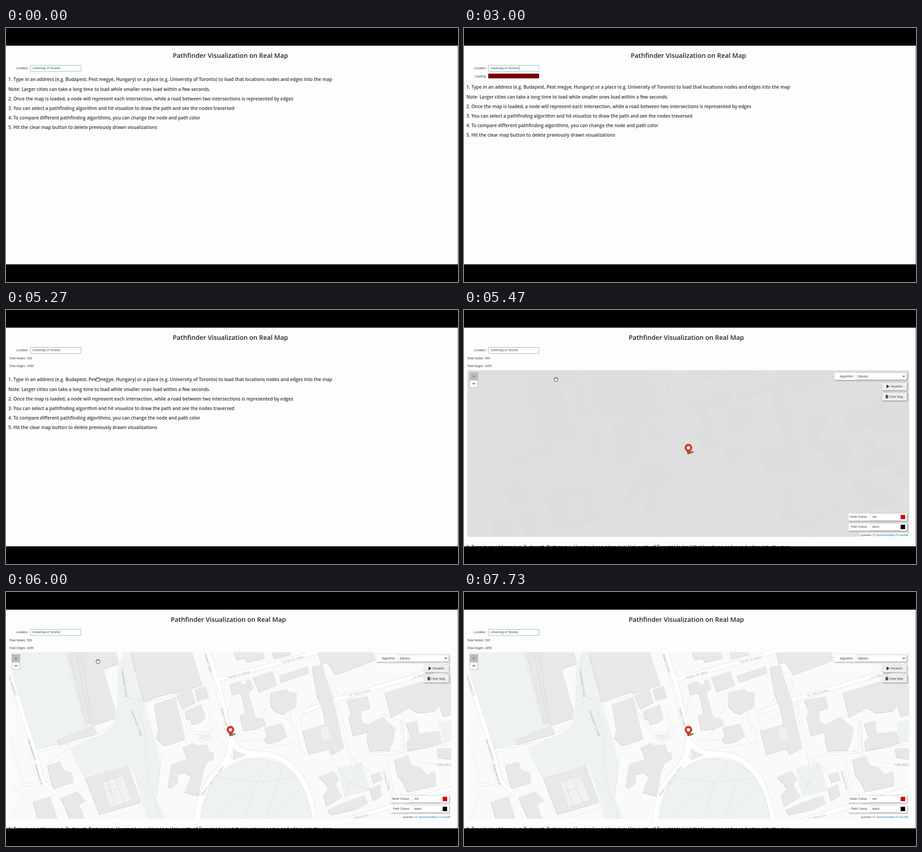
An HTML page for the animation above (8 s loop, 998x561 px).

```html
<!DOCTYPE html>
<html lang="en">
<head>
<meta charset="utf-8">
<title>Pathfinder Visualization</title>
<style>
  html, body { margin: 0; height: 100%; overflow: hidden; background: #000; }
  svg { display: block; width: 998px; height: 561px; }
  text { font: 6.76px "Liberation Sans", Arial, sans-serif; fill: #444; white-space: pre; }
  #title { font: 600 14.35px "Open Sans", sans-serif; fill: #222629; text-anchor: middle; }
  #help text { font: 600 10px "Open Sans", sans-serif; fill: #303437; }
  #labels text { font: 6.6px "Open Sans", sans-serif; fill: #a0a2a4; text-anchor: middle; letter-spacing: .2px; }
  .panel { fill: #fff; filter: drop-shadow(1px 1.5px 1.5px #0007); }
  .button { fill: #eee; filter: drop-shadow(1px 1.5px 1.5px #0007); }
  .field { fill: #fff; stroke: #c4c8c4; stroke-width: .7; }
  .park { fill: #eef3f0; }
  .casing { stroke: #d9dbdb; }
  .road { stroke: #fff; }
  .roads { fill: none; stroke-linejoin: round; }
  .paths { fill: none; stroke: #d0d3d3; stroke-width: .9; stroke-dasharray: 2 1.6; }
</style>
</head>
<body>
<svg viewBox="0 0 998 561">
  <defs>
    <clipPath id="mapClip"><path d="M7 133H983V501H7Z"/></clipPath>
    <g id="buildings">
      <path d="M137 133L178 292L187 288L198 293L243 278L242 258L237 246L216 170L250 158L243 133Z
        M114 326L194 293L201 312L120 337Z
        M275 133H411L434 205L373 224L371 220L305 242Z
        M328 247L374 232L396 324L360 337L349 338L332 322L337 303Z
        M377 228L409 212L419 244L390 258Z
        M397 262L432 248L441 278L430 288L411 292L409 282L399 281Z"/>
      <path d="M495 203L518 196L521 205L533 201L531 194L539 193L547 211L536 222L551 276L570 281L574 293L552 302L525 306L517 272L529 266L520 222L500 227Z
        M546 188L588 175L599 205L560 220Z
        M585 221L621 214L624 220L642 222L641 254L625 261L613 270L596 264L585 252Z
        M572 299L610 290L621 319L602 329L579 335L570 325L577 316Z
        M504 133H567L572 146L532 155L529 146L510 150Z M588 133H627L630 138L592 147Z
        M604 184L666 164L670 178L609 199Z
        M676 165L699 160L704 180L721 228L747 344L722 359L716 352L700 258L687 227Z"/>
      <path d="M655 306L705 292L718 345L669 358Z
        M690 133H812L816 150L728 183L718 165L710 155L696 158Z
        M752 238L799 230L805 256L784 263L787 288L800 293L803 308L767 317L757 276L762 264Z
        M837 222L983 178V270L966 275L958 251L947 263L909 267L891 255L872 266L851 276Z
        M801 291L832 275L845 289L861 300L855 330L848 349L804 351L797 324Z
        M884 290L908 284L912 312L957 307L963 334L930 342L888 350L885 330L894 319Z"/>
      <path d="M391 343L413 332L418 338L444 337L449 352L458 355L460 368L444 376L436 398L426 450L394 442L409 408L397 398L378 403L381 420L364 433L358 428L366 380L401 368Z
        M92 382L120 374L127 393L146 398L149 420L107 433L101 422Z
        M175 409L270 383L299 464L207 491Z
        M60 463L98 451L114 501H71Z M121 454L157 440L176 460L162 470L174 501H142Z
        M691 408L724 395L736 413L728 426L743 452L708 473L701 447L714 433L703 420Z
        M710 481L744 465L793 449L799 466L772 480L718 492Z
        M804 434L826 424L831 449L811 461Z M806 403L826 397L832 414L812 421Z
        M858 370L888 361L896 383L914 386L930 403L947 395L951 427L887 441L875 416L866 407Z
        M952 345H983V369L956 365Z"/>
    </g>
    <path id="streets" d="M440 125L468 219L494 323M7 176L61 344L82 419L110 445M463 195L650 143L705 125M655 265L734 236L990 160M730 510L850 474L983 435"/>
    <path id="crescent" d="M443 125L471 220L495 322Q505 355 554 358Q620 356 657 420Q674 460 682 510M495 320Q500 359 474 388Q426 435 421 510M472 390Q510 357 558 360"/>
    <path id="lanes" d="M65 352L203 317L237 294M305 242L374 225L389 264L408 309L438 314L474 298M420 315Q440 345 458 317M719 190L768 390M770 365L797 359L860 354L983 333M875 285V350M838 353L856 460M52 356L75 420L40 427L7 320"/>
  </defs>

  <path fill="#fdfdfd" d="M0 39H998V522H0Z"/>
  <text id="title" y="66">Pathfinder Visualization on Real Map</text>
  <text x="22" y="91.3">Location:</text>
  <path fill="#fff" stroke="#83bcc5" d="M54 82.5H165.5V96H54Z"/>
  <text x="58.3" y="91.3">University of Toronto</text>
  <path id="caret" stroke="#222" stroke-width=".8" d="M121.6 85V93"/>
  <g id="loading">
    <text x="23.5" y="108.5">Loading:</text>
    <path fill="#780000" d="M53.5 100.8H166V111.2H53.5Z"/>
  </g>
  <g id="totals">
    <text x="7" y="108.5">Total Nodes: 593</text>
    <text x="7" y="125.5">Total Edges: 1656</text>
  </g>
  <g id="help"></g>

  <g id="map">
    <path fill="#dcdcdc" d="M7 133H983V501H7Z"/>
    <g id="tiles" clip-path="url(#mapClip)">
      <path fill="#fafbf9" d="M7 133H983V501H7Z"/>
      <path class="park" d="M10 133H137L190 292L201 314L66 350L44 290L17 197Z
        M248 158L262 133H275L305 242L334 345L342 380L333 458L352 501H310L284 405L272 383L171 408L140 345L201 317L244 282Z
        M732 388L785 377L805 438L747 453Z M424 314L447 307L455 317L442 332L428 325Z M955 290L983 282V330L965 334Z"/>
      <g class="roads">
        <g class="casing">
          <use href="#streets" stroke-width="10.5"/>
          <use href="#crescent" stroke-width="14.5"/>
          <use href="#lanes" stroke-width="5.5"/>
        </g>
        <g class="road">
          <use href="#streets" stroke-width="9"/>
          <use href="#crescent" stroke-width="13"/>
          <use href="#lanes" stroke-width="4"/>
        </g>
        <path class="casing" stroke-width=".8" d="M440 133L468 219L494 323M131 133L174 294M146 133L190 287"/>
      </g>
      <path class="park" stroke="#dcdfdd" d="M432 505Q438 437 474 402Q510 368 555 369Q618 370 651 422Q668 452 677 505Z"/>
      <path fill="#e9e9e5" stroke="#d8d8d6" stroke-width=".7" d="M502 345Q510 355 529 360L501 371Q505 357 502 345Z"/>
      <g class="paths">
        <path d="M262 133Q252 185 274 234Q306 270 308 330Q307 410 329 459L340 501M274 234L243 263M274 234L306 242M217 170L274 234M283 405L330 460"/>
        <path d="M460 490L555 420L585 371M555 420L640 410M575 501L613 378M585 501L655 430M470 410L555 420L525 501"/>
        <path d="M500 230L480 302L520 330L570 325M545 315L575 250L585 238M642 255L675 280L740 250M610 275L640 295L650 345M620 320L665 360L700 385M625 261L635 310M565 345L655 330M690 230L650 275L655 305"/>
        <path d="M732 388L760 422L805 438M785 377L760 422L747 453M735 430L760 422L790 405M760 365L805 395M830 270L875 285L880 350M810 265L830 245M860 350L910 375L983 385M960 320L983 300M870 445L905 475"/>
        <path d="M15 501L38 445L7 435M150 370L175 408M300 475L230 501M345 350L335 430M445 255L460 300M450 300L485 340M90 380L140 345"/>
      </g>
      <use href="#buildings" fill="#d9dada" x="-1.2" y="1.8"/>
      <use href="#buildings" fill="#e8e8e8"/>
      <path fill="#e5e8ea" d="M416 216L440 207L449 234L422 242Z"/>
      <path fill="#f1f2ef" stroke="#d9dada" d="M211 420L259 405L278 460L230 477Z"/>
      <path fill="none" stroke="#d5d6d6" d="M223 417L240 472M242 410L248 434L225 441M248 434L264 465M165 133L190 287M155 133L184 289"/>
      <path class="park" d="M694 301L710 297L717 323L700 329Z"/>
      <g id="labels"></g>
    </g>

    <ellipse cx="500" cy="315" rx="8" ry="2.3" fill="#0007" transform="rotate(-18 500 315)"/>
    <path fill="#d33d2a" stroke="#a82c20" stroke-width=".7" d="M495.5 318.5Q493 313 489.5 309.3A8 8 0 1 1 501.5 309.3Q498 313 495.5 318.5Z"/>
    <circle cx="495.5" cy="304.3" r="3.6" fill="#fff"/>

    <path fill="#bcbcbc" d="M13 138H30.5V155H13Z"/>
    <path fill="#fff" d="M13 155H30.5V171H13Z"/>
    <path fill="none" stroke="#aaa" stroke-width=".8" d="M13 138H30.5V171.5H13ZM13 155H30.5"/>
    <path stroke="#777" stroke-width="1.2" d="M18.5 146.5H25M21.75 143.2V149.8"/>
    <path stroke="#222" stroke-width="1.4" d="M19 162.8H24.8"/>

    <rect class="panel" x="818" y="138" width="160" height="16.5" rx="1"/>
    <path class="field" d="M865.5 139H976.5V153.5H865.5Z"/>
    <text x="830" y="148.7">Algorithm:</text>
    <text x="869.5" y="148.7">Dijkstra</text>
    <path fill="none" stroke="#222" stroke-width="1.2" d="M968.5 144.8L971 147.3L973.5 144.8"/>
    <rect class="button" x="923" y="160.5" width="55" height="17"/>
    <path fill="#222" d="M933 165L939.5 168.7L933 172.5Z"/>
    <text x="941" y="171">Visualize</text>
    <rect class="button" x="923" y="183" width="55" height="17"/>
    <path fill="#222" d="M930.5 188.5H932.5V187.3H934.7V188.5H936.7V189.7H930.5ZM931 190.2H936.2V195H931Z"/>
    <path stroke="#bbb" stroke-width=".5" d="M932.5 191V194.3M933.6 191V194.3M934.7 191V194.3"/>
    <text x="938.3" y="193.8">Clear Map</text>

    <rect class="panel" x="849" y="449" width="129" height="16.5" rx="1"/>
    <path class="field" d="M897 450H962V464.5H897Z"/>
    <text x="852" y="459.3">Node Colour:</text><text x="901.3" y="459.3">red</text>
    <path fill="#e60000" stroke="#888" stroke-width=".5" d="M964.2 452.3H974V462H964.2Z"/>
    <rect class="panel" x="849" y="471" width="129" height="16.5" rx="1"/>
    <path class="field" d="M897 472H962V486.5H897Z"/>
    <text x="854.5" y="481.3">Path Colour:</text><text x="901.3" y="481.3">black</text>
    <path d="M964.2 474.3H974V484H964.2Z"/>
    <path fill="#fffc" d="M874 492.5H983V501H874Z"/>
    <text x="876" y="499" style="font-size:5.85px">ipyleaflet | © <tspan fill="#0078a8">OpenStreetMap</tspan> © <tspan fill="#0078a8">CartoDB</tspan></text>
  </g>

  <g id="hand" stroke="#222" stroke-width=".9" stroke-linejoin="round">
    <path fill="#fff" d="M200.5 157.5L198.3 153.6Q198.5 152 200 153V149.8Q200.8 148.6 201.7 149.8Q202.5 148 203.6 149.4Q204.7 148.4 205.4 150Q206.9 149.6 207 151.2V154.5L205.8 157.5Z"/>
    <path stroke-width=".6" d="M201.7 150V152.6M203.6 149.6V152.6M205.4 150.2V152.6"/>
  </g>
  <path stroke="#555" stroke-width=".8" d="M997.6 39V522"/>
  <path d="M0 0H998V39H0ZM0 522H998V561H0Z"/>
</svg>
<script>
const $ = id => document.getElementById(id);
const show = (id, on) => $(id).setAttribute('visibility', on ? 'visible' : 'hidden');
const LOOP = 8000, LOADING = 900, LOADED = 5060, MAP = 5400, TILES = 5450, HAND_GONE = 7400;

$('help').innerHTML = [
  '1. Type in an address (e.g. Budapest, Pest megye, Hungary) or a place (e.g. University of Toronto) to load that locations nodes and edges into the map',
  'Note: Larger cities can take a long time to load while smaller ones load within a few seconds.',
  '2. Once the map is loaded, a node will represent each intersection, while a road between two intersections is represented by edges',
  '3. You can select a pathfinding algorithm and hit visualize to draw the path and see the nodes traversed',
  '4. To compare different pathfinding algorithms, you can change the node and path color',
  '5. Hit the clear map button to delete previously drawn visualizations'
].map((line, i) => `<text x="5.2" y="${117.3 + i * 21.2}">${line}</text>`).join('');

$('labels').innerHTML = [
  ["Baker's Lawn", 447, 158, 72], ["Baker's Lawn", 482, 278, 74],
  ["Baker's Lawn Cres. West", 456, 417, -53],
  ['Harlen St. West', 514, 183, -14], ['Harlen St. West', 633, 149, -14],
  ['St. Odra Street', 781, 223, -15], ['St. Odra Street', 922, 183, -15],
  ['Marrowfield Pl', 14, 206, 72], ['Marrowfield Pl', 57, 349, 72], ['Marrowfield Pl', 72, 404, 74],
  ["Cartwheeler's Walk", 261, 202, 82], ["Cartwheeler's Walk", 288, 290, 70],
  ['Ormley Place', 840, 417, 74], ['St. Bellan St', 779, 497, -15], ['OAK WEST', 968, 382, 0]
].map(([name, x, y, angle]) => `<text transform="translate(${x} ${y}) rotate(${angle})" y="2">${name}</text>`).join('');

const caretOn = [[470, 1000], [1500, 2030], [2570, 3100], [3800, 4100], [4630, 5160]];

function draw(now) {
  const t = now % LOOP, mapOpen = t >= MAP;
  const shift = mapOpen ? 410 : t >= LOADED ? 40.2 : t >= LOADING ? 17 : 0;
  show('caret', caretOn.some(([from, to]) => t >= from && t < to));
  show('loading', t >= LOADING && t < LOADED);
  show('totals', t >= LOADED);
  show('hand', t >= LOADED && t < HAND_GONE);
  show('map', mapOpen);
  $('title').setAttribute('x', mapOpen ? 491 : 495.5);
  $('help').setAttribute('transform', `translate(0 ${shift})`);
  $('tiles').setAttribute('opacity', Math.min(1, Math.max(0, (t - TILES) / 200)));
  requestAnimationFrame(draw);
}
draw(performance.now());
</script>
</body>
</html>
```
